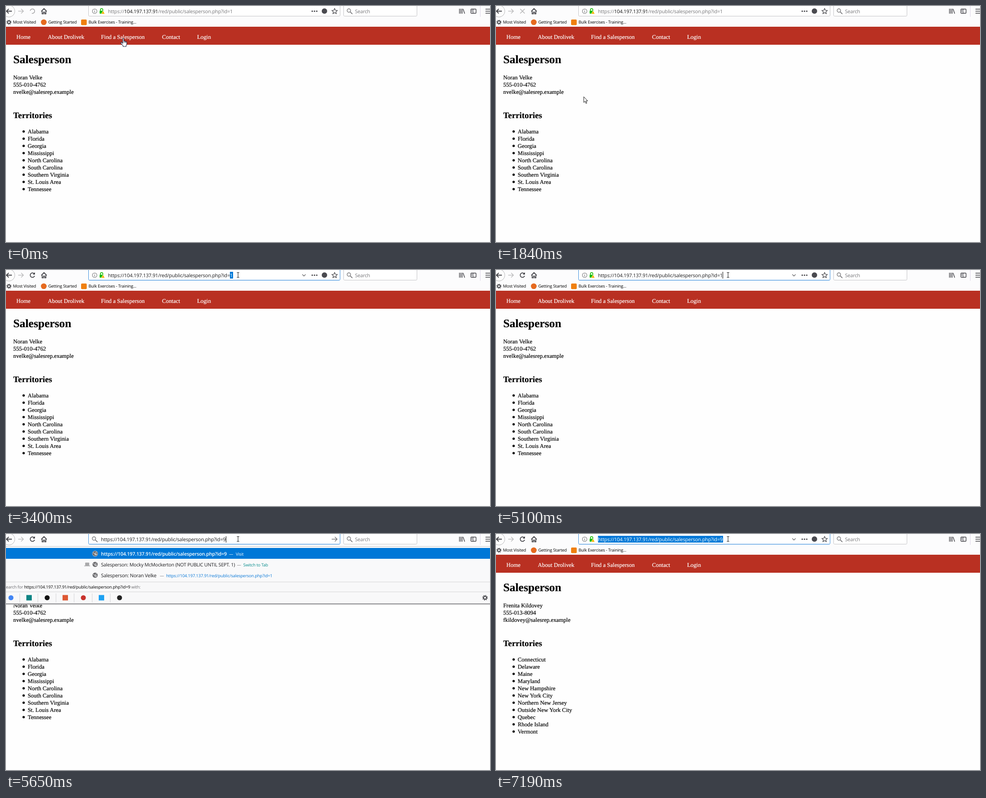
Animation, 1070 px wide and 524 px high, one loop 8 s. Source, as an HTML page:

```html
<!DOCTYPE html>
<html lang="en">
<head>
<meta charset="utf-8">
<title>Salesperson directory</title>
<style>
  html, body { margin: 0; width: 100%; height: 100%; overflow: hidden; background: #fefefe; }
  svg { display: block; }
  text { white-space: pre; text-rendering: geometricPrecision; }
  .ui { font-family: "Open Sans", "Noto Sans", sans-serif; letter-spacing: -.02em; }
  .page { font-family: "Liberation Serif", "Times New Roman", serif; stroke-width: .2px; }
  .link { text-decoration: underline; }
</style>
</head>
<body>
<svg id="stage" width="1070" height="524" viewBox="0 0 1070 524"></svg>
<script>
const LOOP = 8000;
const stage = document.getElementById('stage');
const DARK = '#3f3f44', BLUE = '#0078d7', GREY = '#77777a', INK = '#1c1c1e';

// Drawing helpers
const rect = (x, y, w, h, fill, more = '') =>
  `<rect x="${x}" y="${y}" width="${w}" height="${h}" fill="${fill}" ${more}/>`;
const dot = (x, y, r, fill, more = '') =>
  `<circle cx="${x}" cy="${y}" r="${r}" fill="${fill}" ${more}/>`;
const line = (d, color = DARK, width = 1.5, fill = 'none') =>
  `<path d="${d}" stroke="${color}" stroke-width="${width}" fill="${fill}"/>`;
const label = (kind, x, y, size, s, fill = '#000', more = '') =>
  `<text class="${kind}" x="${x}" y="${y}" font-size="${size}" fill="${fill}" ${more}>${s}</text>`;
const ui = (...a) => label('ui', ...a);
const print = (x, y, size, s, fill = '#000', more = '', kind = 'page') =>
  label(kind, x, y, size, s, fill, `stroke="${fill}" ${more}`);
const serif = (x, y, s, fill, more) => print(x, y, 12.8, s, fill, more);
const BOLD = 'font-weight="bold"';
const span = (s, fill) => `<tspan fill="${fill}">${s}</tspan>`;
const at = (t, steps) => steps.filter(s => s[0] <= t).pop().slice(1);

const gear = (x, y, s) =>
  dot(x, y, 2.9 * s, 'none', `stroke="${DARK}" stroke-width="${1.6 * s}"`) +
  dot(x, y, 4.5 * s, 'none', `stroke="${DARK}" stroke-width="${1.8 * s}" stroke-dasharray="${1.767 * s}"`);
const lens = (x, y) =>
  dot(x, y, 3.8, 'none', `stroke="${GREY}" stroke-width="1.4"`) +
  line(`M${x + 2.8} ${y + 2.8}l5 5`, GREY, 1.7);
const globe = (x, y) => dot(x, y, 5.7, '#6b6b6e') +
  line(`M${x - 4} ${y - 2}l3 2 1 3 2-1-1-3 2-3M${x + 2} ${y + 3}l2-2`, '#e4e4e6', 1.2);

// Timeline
const PAGES = [[0, 'first'], [270, 'list'], [1840, 'first'], [6200, 'second']];
const RELOAD = [[0, 'spin', 40], [140, 'stop', DARK], [270, 'stop', '#b4b4b6'],
  [420, 'spin', 200], [540, 'spin', 280], [660, 'spin', 340], [810, 'ready'],
  [1600, 'stop', DARK], [1840, 'stop', '#b4b4b6'],
  [1990, 'spin', 200], [2140, 'spin', 280], [2260, 'spin', 340], [2410, 'ready'],
  [6050, 'stop', DARK], [6200, 'stop', '#b4b4b6'],
  [6340, 'spin', 200], [6460, 'spin', 280], [6610, 'spin', 340], [6760, 'ready']];
const POINTER = [[0, 'hand', 253, 71], [420, 'arrow', 263, 150], [540, 'arrow', 200, 198],
  [660, 'arrow', 128, 212], [810, 'arrow', 122.5, 213], [930, 'arrow', 115, 218],
  [1050, 'arrow', 106, 223], [1200, 'hand', 97, 228], [1840, 'arrow', 193.5, 201],
  [1990, 'arrow', 374, 103], [2140, 'arrow', 430, 62], [2260, 'arrow', 464, 41],
  [2410, 'arrow', 508, 38], [2560, 'arrow', 514, 23], [2710, 'beam', 513, 11]];
const FIELD = [[0, 'idle'], [2710, 'hover'], [2970, 'all'], [3400, 'last'], [4270, 'caret'],
  [4540, 'plain'], [5100, 'caret'], [5370, 'typing'], [5900, 'going'], [6200, 'hover'], [7190, 'all']];

// Web pages
const PEOPLE = {
  first: { name: 'Noran Velke', phone: '555-010-4762', mail: 'nvelke@salesrep.example',
    areas: ['Alabama', 'Florida', 'Georgia', 'Mississippi', 'North Carolina', 'South Carolina',
      'Southern Virginia', 'St. Louis Area', 'Tennessee'] },
  second: { name: 'Frenita Kildovey', phone: '555-013-8094', mail: 'fkildovey@salesrep.example',
    areas: ['Connecticut', 'Delaware', 'Maine', 'Maryland', 'New Hampshire', 'New York City',
      'Northern New Jersey', 'Outside New York City', 'Quebec', 'Rhode Island', 'Vermont'] }
};
const STATES = [
  ['Alabama (AL)', '@Noran Velke'],
  ['Alaska (AK)', '@Walter Drimsole'],
  ['Arizona (AZ)', '@Hilde Fostin'],
  ['Arkansas (AR)', '@Margarete Ulvin'],
  ['California (CA)', 'Northern California', '@Walter Drimsole', 'Southern California', '@Stella Krovine'],
  ['Colorado (CO)', '@Hilde Fostin']
];

const heading = s => print(16, 127, 25.4, s, '#000', BOLD);

function personPage({ name, phone, mail, areas }) {
  return heading('Salesperson') +
    [name, phone, mail].map((s, i) => serif(16, 163 + 16 * i, s)).join('') +
    print(16, 249, 18.8, 'Territories', '#000', BOLD) +
    areas.map((s, i) => dot(39, 278.6 + 16 * i, 2.6, '#000') + serif(48, 283 + 16 * i, s)).join('');
}

function listPage(pressed) {
  let y = 191.5;
  let out = heading('Find a Salesperson') +
    serif(16, 163, 'Use the list below to find a salesperson nearby. We are ready to serve you!') +
    serif(16, y, 'UNITED STATES', '#000', BOLD);
  STATES.forEach(([state, ...rows], group) => {
    y += 28.7;
    out += serif(16, Math.round(y), state);
    rows.forEach((row, i) => {
      y += 16;
      const base = Math.round(y), isLink = row[0] === '@';
      if (!isLink || i === 0) out += rect(36, base - 6, 5, 5, '#000');
      const color = pressed && group === 0 ? '#e00' : '#00e';
      out += isLink
        ? print(48, base, 12.8, row.slice(1), color, '', 'page link')
        : serif(48, base, row);
    });
  });
  return out + rect(1066, 46, 4, 478, '#f0f0f0') + rect(1066.5, 60, 3.5, 68, '#cdcdcd');
}

const navBar = width => rect(0, 46, width, 40, '#b93022') +
  [[23, 'Home'], [92.5, 'About Drolivek'], [210, 'Find a Salesperson'], [345, 'Contact'], [422.5, 'Login']]
    .map(([x, s]) => serif(x, 73, s, '#fff')).join('');

// Browser frame
const bookmarks = gear(6.5, 36, 1) + ui(15.5, 39.3, 9.3, 'Most Visited') +
  dot(83.5, 36, 6.3, '#e66a1f') + ui(93.5, 39.3, 9.3, 'Getting Started') +
  rect(166, 30, 12.5, 12.5, '#f0800f', 'rx="2"') + ui(182.5, 39.3, 9.3, 'Bulk Exercises - Training...');

const toolbar = rect(0, 0, 1070, 46, '#fcfcfd') +
  dot(6.5, 11.5, 13, '#fdfdfd', 'stroke="#b5b5b7"') +
  line('M13 11.5H1M6 6.5l-5 5 5 5', DARK, 1.8) +
  line('M27 11.5H38M33.5 6.5l5 5-5 5', '#bdbdbf', 1.6) +
  line('M78 11.8l6-6 6 6M79.8 11V17.3H82.7V13.5H85.5V17.3H88.2V11', DARK, 1.7) +
  rect(746.5, -3.5, 162, 26, '#fff', 'stroke="#c4c4c6" rx="2"') +
  lens(758, 10) + ui(771.5, 16, 11, 'Search', GREY) +
  line('M1002.5 6V17M1005.5 6V17M1008.5 6V17M1010.5 6.5l3.5 10.5', DARK, 1.4) +
  rect(1027.7, 6.7, 11.5, 9.5, 'none', `stroke="${DARK}" stroke-width="1.4" rx="1.5"`) +
  line('M1032.5 7V16M1029 9.5h2M1029 12h2', DARK, 1.2) +
  line('M1048.5 0V24', '#dcd6e6', 1) +
  line('M1060 7H1070M1060 11.5H1070M1060 16H1070', DARK, 1.6);

function reload([kind, value]) {
  if (kind === 'stop') return line('M53.5 6.5l10 10M63.5 6.5l-10 10', value, 1.5);
  if (kind === 'spin') return `<g transform="rotate(${value} 58.5 11.5)">` +
    line('M54 14A5 5 0 1 1 60.5 16', '#a2a2a5', 1.5) + '</g>';
  return line('M62.6 8.5A5 5 0 1 0 63.3 13', DARK, 1.7) + line('M64 5V10H59Z', 'none', 0, DARK);
}

const HOST = '104.197.137.91';
const fullUrl = id => `https://${HOST}/red/public/salesperson.php?id=${id}`;
const shadedUrl = path => span('https://', GREY) + span(HOST, '#111') + span('/red/public/' + path, GREY);

const identity = dot(196, 11.5, 5, 'none', `stroke="${GREY}" stroke-width="1.1"`) +
  line('M196 8.3v1.5M196 11v3.6', GREY, 1.3) +
  line('M208.7 11V8.5a2.7 2.7 0 0 1 5.4 0V11', '#12bc00', 1.6) + rect(207, 10.5, 8.5, 6.5, '#12bc00', 'rx="1"') +
  line('M214.5 10.5l4 7.3h-8z', '#fff', .7, '#f5b400');

const actions = [677, 682, 687].map(x => dot(x, 11.5, 1.6, DARK)).join('') +
  dot(704, 11.3, 6, '#4a4a50') +
  line('M726.5 5.5l1.8 4 4.2.4-3.2 2.9 1 4.2-3.8-2.3-3.8 2.3 1-4.2-3.2-2.9 4.2-.4z', DARK, 1.2);

function addressBar(mode, page, id) {
  const focused = ['all', 'last', 'caret', 'plain', 'typing'].includes(mode);
  const edge = focused ? '#3d8fdd' : mode === 'idle' ? '#c4c4c6' : '#9b9b9e';
  let out = rect(182.5, -3.5, 556, 26, '#fff', `stroke="${edge}" rx="2"`);
  if (focused) out += line('M183 23.5H738', '#cfe3f6', 1);
  if (mode === 'typing') {
    return out + lens(194.5, 10) + ui(210, 16, 11, fullUrl(id), INK) +
      rect(id ? 486 : 479, 5, 1, 14, '#000') + line('M720 11.5H732M727 6.5l5 5-5 5', GREY, 1.5);
  }
  if (mode === 'going') return out + lens(194.5, 10) + ui(210, 16, 11, shadedUrl('salesperson.php?id=' + id));
  out += identity + actions;
  if (!focused) {
    return out + ui(225.5, 16, 11, shadedUrl(page === 'list' ? 'territories.php' : 'salesperson.php?id=' + id));
  }
  out += line('M655 9.7l3.7 3.7 3.7-3.7', GREY, 1.5);
  if (mode === 'all') out += rect(225.5, 4, 276.5, 15, BLUE);
  if (mode === 'last') out += rect(495, 4, 7, 15, BLUE);
  if (mode === 'caret') out += rect(501, 4, 1, 15, '#000');
  const ink = mode === 'all' ? '#fff' : INK;
  return out + ui(225.5, 16, 11, fullUrl('') + span(id, mode === 'last' ? '#fff' : ink), ink);
}

function suggestions(id) {
  const engines = ['#4285f4', '#0c8484', '#111', '#de5833', '#c8322c', '#1da1f2', '#222'];
  return rect(0, 27, 1070, 129, '#f9f9fa') + line('M0 27.5H1070', '#c8c8ca', 1) +
    rect(0, 31, 1070, 24, BLUE) + dot(197, 43.5, 6.3, '#dfe9f3') + globe(197, 43.5) +
    ui(210, 47.5, 10.8, fullUrl(id), '#fff', 'font-weight="600"') +
    ui(id ? 493 : 486, 47.5, 9.4, '—', '#fff') + ui(id ? 508 : 501, 47.5, 9.4, 'Visit', '#fff') +
    rect(175, 63.5, 9, 6.5, '#a9a9ab', 'rx="1"') + rect(173, 70, 13, 1.5, '#a9a9ab') +
    globe(197, 67.5) +
    ui(210, 72, 10.6, 'Salesperson: Mocky McMockerton (NOT PUBLIC UNTIL SEPT. 1)', INK) +
    ui(510.5, 72, 9.3, '—', GREY) + ui(524.5, 72, 9.3, 'Switch to Tab', '#058b8b') +
    globe(197, 91.5) + ui(210, 96, 10.8, 'Salesperson: Noran Velke', INK) +
    ui(340, 96, 9.3, '—', GREY) + ui(354, 96, 9.4, fullUrl(1), '#0a78d7') +
    rect(0, 106, 1070, 49, '#f8f8f9') + line('M0 106.5H1070M0 128.5H1070', '#d4d4d6', 1) +
    ui(-5, 121.3, 9.4, 'Search for ' + span(fullUrl(id), '#000') + ' with:', '#6c6c70') +
    engines.map((c, i) => (i % 2 ? rect(5 + 40 * i, 135.5, 12, 12, c) : dot(11 + 40 * i, 141.5, 5.5, c)) +
      (i < 6 ? rect(30 + 40 * i, 132, 1, 20, '#d4d4d6') : '')).join('') +
    gear(1059, 141.5, 1.1) + rect(0, 154, 1070, 2, '#98989b') + rect(0, 156, 1070, 1, '#cfcfd1');
}

const SHAPES = {
  arrow: line('M.5.5V13.2L3.4 10.5 5.4 15.3 7.4 14.5 5.4 9.8H9.3Z', '#111', 1, '#fff'),
  hand: line('M5 12V2.2Q5 .7 6.2.7T7.5 2.2V7Q9.7 6 10 7.8 11.8 7 12 8.6 13.8 8 14 9.8V13Q14 15.5 12.5 17V19H5.8V17.2' +
    'L1.2 12Q.3 10.4 1.4 9.8T3.6 10.6Z', '#1c2440', 1.1, '#fff') + line('M7.5 7v4M10 8v3M12 9v2', '#1c2440', .8),
  beam: line('M-2.5-5.5H-.8Q0-5.5 0-4.7 0-5.5.8-5.5H2.5M0-5V5M-2.5 5.5H-.8Q0 5.5 0 4.7 0 5.5.8 5.5H2.5', '#111', 1)
};

function scene(t) {
  const [page] = at(t, PAGES), [mode] = at(t, FIELD), [shape, x, y] = at(t, POINTER);
  const typing = mode === 'typing';
  const id = typing ? (t < 5650 ? '' : '9') : t < 5900 ? '1' : '9';
  const isList = page === 'list';
  return rect(0, 0, 1070, 524, '#fefefe') +
    (isList ? listPage(t >= 1600) : personPage(PEOPLE[page])) + navBar(isList ? 1066 : 1070) +
    toolbar + bookmarks + reload(at(t, RELOAD)) + addressBar(mode, page, id) +
    (typing ? suggestions(id) : '') +
    `<g transform="translate(${x} ${y})">${SHAPES[shape]}</g>`;
}

const start = performance.now();
let shown = '';
function tick() {
  const next = scene((performance.now() - start) % LOOP);
  if (next !== shown) stage.innerHTML = shown = next;
  requestAnimationFrame(tick);
}
tick();
</script>
</body>
</html>
```
